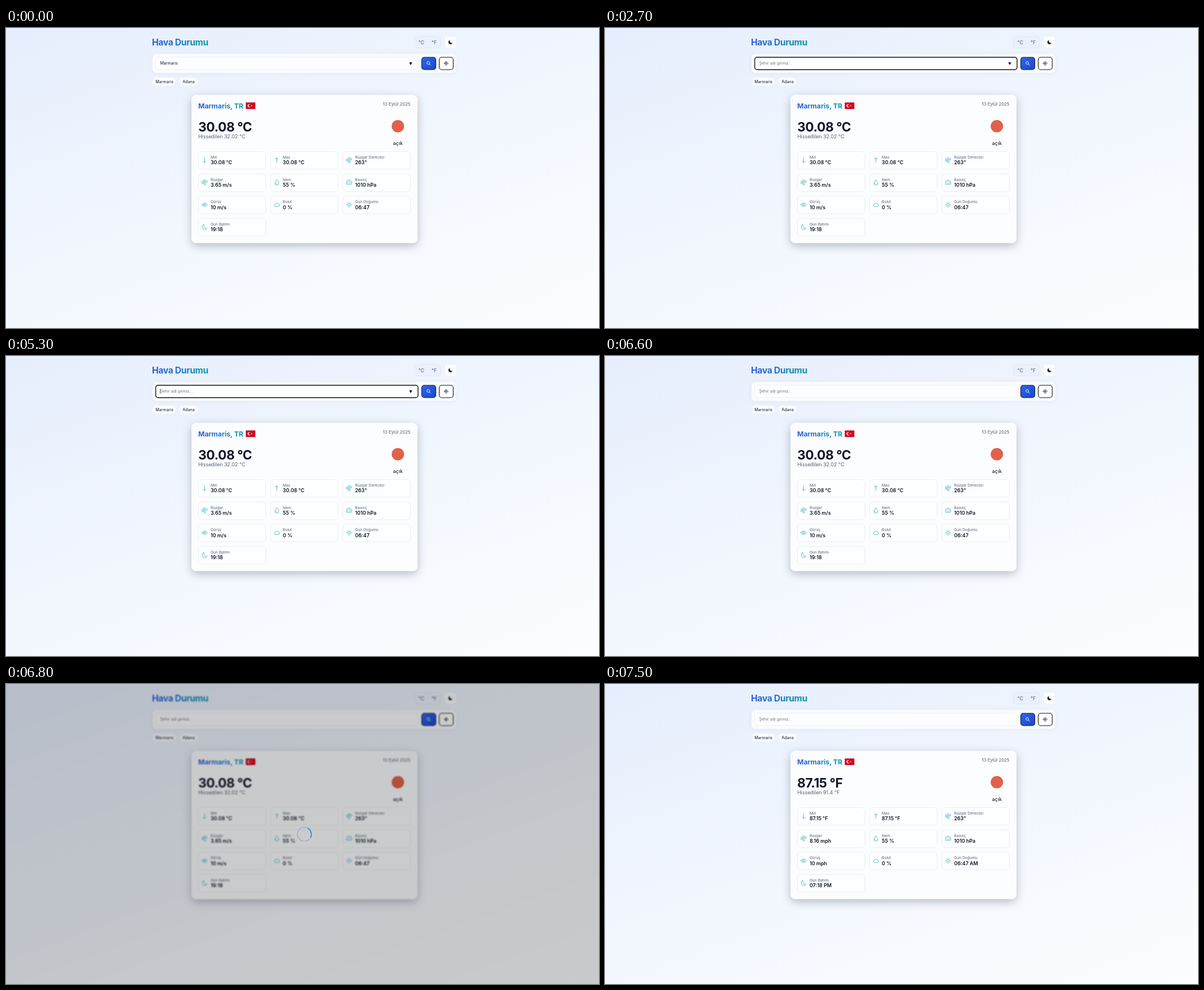
Animation of 1052x533 px, one loop 8000 ms. Source, as an HTML page:

```html
<!DOCTYPE html>
<html lang="tr">
<head>
<meta charset="utf-8">
<title>Hava Durumu</title>
<style>
html, body { margin: 0; width: 100%; height: 100%; overflow: hidden; }
body { position: relative; background: linear-gradient(160deg, #e6eefd, #f3f8fe 55%, #fcfdff); }
svg { position: absolute; left: 0; top: 0; display: block; }
text { font-family: Inter, sans-serif; white-space: pre; }
.line { fill: none; stroke-linecap: round; stroke-linejoin: round; }
.card { filter: drop-shadow(0 5px 8px rgba(20, 25, 40, .27)); }
.panel { filter: drop-shadow(0 1px 3px rgba(40, 70, 130, .06)); }
#overlay { position: absolute; inset: 0; background: rgba(0, 0, 0, .2); backdrop-filter: blur(1px); }
</style>
</head>
<body>
<svg id="page" width="1052" height="533" viewBox="0 0 1052 533">
  <defs>
    <linearGradient id="title"><stop stop-color="#2f5bdc"/><stop offset="1" stop-color="#0f9bae"/></linearGradient>
    <linearGradient id="button" x2="1" y2="1"><stop stop-color="#2f66ea"/><stop offset="1" stop-color="#1b48cc"/></linearGradient>
  </defs>
</svg>
<div id="overlay">
  <svg width="1052" height="533" viewBox="0 0 1052 533" class="line" stroke-width="1.5">
    <circle cx="529.3" cy="267" r="12.4" stroke="#a5a8dc"/>
    <circle id="spinner" cx="529.3" cy="267" r="12.4" stroke="#0b91ae" pathLength="4" stroke-dasharray="1 3" stroke-linecap="butt"/>
  </svg>
</div>
<script>
const page = document.getElementById('page');
const overlay = document.getElementById('overlay');
const spinner = document.getElementById('spinner');

function add(tag, attrs, content) {
  const el = document.createElementNS('http://www.w3.org/2000/svg', tag);
  for (const key in attrs) el.setAttribute(key, attrs[key]);
  if (content) el.textContent = content;
  return page.appendChild(el);
}

const box = (x, y, width, height, rx, fill, stroke = 'none', more = {}) =>
  add('rect', { x, y, width, height, rx, fill, stroke, 'stroke-width': 0.7, ...more });

const label = (x, y, size, fill, content, more = {}) =>
  add('text', { x, y, 'font-size': size, fill, ...more }, content);

// Icons are drawn on a 16-unit square centred on (x, y).
const icon = (x, y, size, d, stroke, more = {}) =>
  add('path', { d, stroke, class: 'line', 'stroke-width': 1.15,
    transform: `translate(${x - size / 2} ${y - size / 2}) scale(${size / 16})`, ...more });

const INK = '#0f172a', MUTED = '#536074', EDGE = '#e1e7f1', TEAL = '#20a7b3';
const MOON = 'M6 1.2A7 7 0 1 0 14.6 11A7.6 7.6 0 0 1 6 1.2Z';
const WIND = 'M.5 5H7.5A2.2 2.2 0 1 0 5.3 2.8M.5 8H13A2.4 2.4 0 1 0 10.6 5.6M.5 11H8.5A2.1 2.1 0 1 1 6.4 13.1';
const rays = [...Array(8).keys()].map(i => {
  const c = Math.cos(i * Math.PI / 4), s = Math.sin(i * Math.PI / 4);
  return `M${8 + 5.8 * c} ${8 + 5.8 * s}L${8 + 7.5 * c} ${8 + 7.5 * s}`;
}).join('');
const ICONS = {
  down: 'M8 1.5V14.5M4 10.5L8 14.5L12 10.5',
  up: 'M8 14.5V1.5M4 5.5L8 1.5L12 5.5',
  wind: WIND,
  drop: 'M8 1C9 4 13.5 6.5 13.5 10A5.5 5.5 0 0 1 2.5 10C2.5 6.5 6.5 4.5 8 1ZM5 9.5A3 3 0 0 0 7 12.5',
  gauge: 'M2.5 13.5A7.2 7.2 0 1 1 13.5 13.5C12 12.6 4 12.6 2.5 13.5ZM8 10L11.5 5.8M8 3.8V5M3.2 9H4.5M11.5 9H12.8M4.4 5.4L5.3 6.3',
  eye: 'M.7 8C4.5 1.8 11.5 1.8 15.3 8C11.5 14.2 4.5 14.2 .7 8ZM5.5 8A2.5 2.5 0 1 0 10.5 8A2.5 2.5 0 1 0 5.5 8',
  cloud: 'M4 13A3.3 3.3 0 0 1 3.5 6.5A4.7 4.7 0 0 1 12.4 7A3 3 0 0 1 12.5 13Z',
  sun: 'M4.5 8A3.5 3.5 0 1 0 11.5 8A3.5 3.5 0 1 0 4.5 8' + rays,
  moon: MOON
};

// Header
label(259, 30.7, 15.6, 'url(#title)', 'Hava Durumu', { 'font-weight': 700, 'letter-spacing': '-.02em' });
box(724.5, 15, 47, 20.5, 5.5, '#eaf1fc', '#d9e2f0');
label(736.7, 28.5, 8.91, MUTED, '°C', { 'text-anchor': 'middle' });
label(759.7, 28.5, 8.91, MUTED, '°F', { 'text-anchor': 'middle' });
box(778, 14.5, 21, 21.5, 5, '#fcfdff', '#e8eef8');
icon(788.4, 25.2, 8.4, MOON, INK, { fill: INK, class: '', 'stroke-width': 0.5 });

// Search row
box(260, 46, 539, 34, 7, '#fafcff', '#f1f5fb', { class: 'panel' });
box(265.3, 52, 465.7, 22, 4.5, '#fdfeff', EDGE);
const focusRing = box(265.6, 52, 465.4, 22, 4.2, 'none', '#10131a', { 'stroke-width': 1.4 });
const typed = label(273.4, 65.4, 7.13, INK, 'Marmaris');
const hint = label(273.4, 65.4, 7.13, '#757575', 'Şehir adı giriniz...');
const caret = box(273.2, 58.2, 0.6, 9, 0, '#222');
const arrow = add('path', { d: 'M715.3 61H720.7L718 66Z', fill: '#111' });
box(737.5, 52, 25, 22, 4.5, 'url(#button)', '#111a35', { 'stroke-width': 1.1 });
icon(749.8, 62.8, 8, 'M1.5 6.5A5 5 0 1 0 11.5 6.5A5 5 0 1 0 1.5 6.5M10.2 10.2L15 15', '#fff', { 'stroke-width': 1.7 });
box(768.6, 52, 24.8, 22, 4.5, '#fdfeff', '#111', { 'stroke-width': 1.1 });
icon(780.8, 62.8, 8, 'M2.5 8A5.5 5.5 0 1 0 13.5 8A5.5 5.5 0 1 0 2.5 8M8 .5V2.5M8 13.5V15.5M.5 8H2.5M13.5 8H15.5', INK, { 'stroke-width': 1.3 });
add('circle', { cx: 780.8, cy: 62.8, r: 1.2, fill: INK });

// Recent cities
for (const [x, width, city] of [[260, 41.5, 'Marmaris'], [308, 32, 'Adana']]) {
  box(x, 87.8, width, 15, 7.5, '#fafcff', '#edf2fa');
  label(x + 5.2, 97.8, 7.13, INK, city);
}

// Weather card
box(329, 118.7, 401, 263.5, 8, '#fcfdfe', 'none', { class: 'card' });
label(341, 142.6, 12.25, 'url(#title)', 'Marmaris, TR', { 'font-weight': 700 });
box(425.4, 132.3, 17, 11.6, 1.2, '#d00a20');
add('circle', { cx: 431.6, cy: 138.1, r: 2.9, fill: '#fff' });
add('circle', { cx: 432.5, cy: 138.1, r: 2.3, fill: '#d00a20' });
add('path', { d: 'M434.6 138.1L437 137.3L435.5 139.4V136.8L437 138.9Z', fill: '#fff' });
label(717.5, 138.3, 7.8, MUTED, '13 Eylül 2025', { 'text-anchor': 'end' });
add('circle', { cx: 695.2, cy: 174.5, r: 11, fill: '#e0624a' });
label(695.2, 207.6, 8.91, '#253047', 'açık', { 'text-anchor': 'middle', 'font-weight': 500 });

// Texts that depend on the unit: [element, metric, imperial]
const unitTexts = [
  [label(341, 183.5, 22.8, INK, '', { 'font-weight': 700, 'letter-spacing': '-.02em' }), '30.08 °C', '87.15 °F'],
  [label(341, 196.2, 8.91, MUTED, ''), 'Hissedilen 32.02 °C', 'Hissedilen 91.4 °F']
];

const details = [
  ['down', 'Min', '30.08 °C', '87.15 °F'],
  ['up', 'Max', '30.08 °C', '87.15 °F'],
  ['wind', 'Rüzgar Derecesi', '263°'],
  ['wind', 'Rüzgar', '3.65 m/s', '8.16 mph'],
  ['drop', 'Nem', '55 %'],
  ['gauge', 'Basınç', '1010 hPa'],
  ['eye', 'Görüş', '10 m/s', '10 mph'],
  ['cloud', 'Bulut', '0 %'],
  ['sun', 'Gün Doğumu', '06:47', '06:47 AM'],
  ['moon', 'Gün Batımı', '19:18', '07:18 PM']
];
details.forEach(([name, title, metric, imperial = metric], i) => {
  const x = 341.3 + (i % 3) * 128.2, y = 219.5 + Math.floor(i / 3) * 39.6;
  box(x, y, 119.8, 31.2, 6, '#fdfeff', EDGE);
  icon(x + 11, y + 15.3, 10.4, ICONS[name], TEAL);
  label(x + 21.6, y + 12.4, 6.68, MUTED, title);
  unitTexts.push([label(x + 21.6, y + 22.9, 8.91, INK, '', { 'font-weight': 600 }), metric, imperial]);
});

const LOOP = 8000, FOCUS = 100, CLEAR = 1000, BLUR = 6000, LOAD = 6700, DONE = 6900;
const BLINK = 520, FADE = 200;
const clamp = v => Math.max(0, Math.min(1, v));
const show = (el, on) => { el.style.display = on ? '' : 'none'; };

function render(now) {
  const t = Math.floor(now % LOOP / 100) * 100;
  const focused = t >= FOCUS && t < BLUR;
  const cleared = t >= CLEAR;
  const blinkOn = t < CLEAR + BLINK || Math.floor((t - CLEAR - 40) / BLINK) % 2 === 0;
  const loading = t >= LOAD && t < DONE;

  focusRing.style.opacity = t < BLUR ? clamp((t - FOCUS + 100) / FADE) : clamp(1 - (t - BLUR + 100) / FADE);
  show(typed, !cleared);
  show(hint, cleared);
  show(arrow, t < BLUR);
  show(caret, focused && blinkOn);
  caret.setAttribute('x', cleared ? 273.2 : 305.2);

  for (const [el, metric, imperial] of unitTexts) {
    const value = t >= DONE ? imperial : metric;
    if (el.textContent !== value) el.textContent = value;
  }
  show(overlay, loading);
  spinner.setAttribute('transform', `rotate(${-135 + (t - LOAD + 100) * 0.36} 529.3 267)`);
}

const start = performance.now();
function tick() {
  render(performance.now() - start);
  requestAnimationFrame(tick);
}
tick();
</script>
</body>
</html>
```
